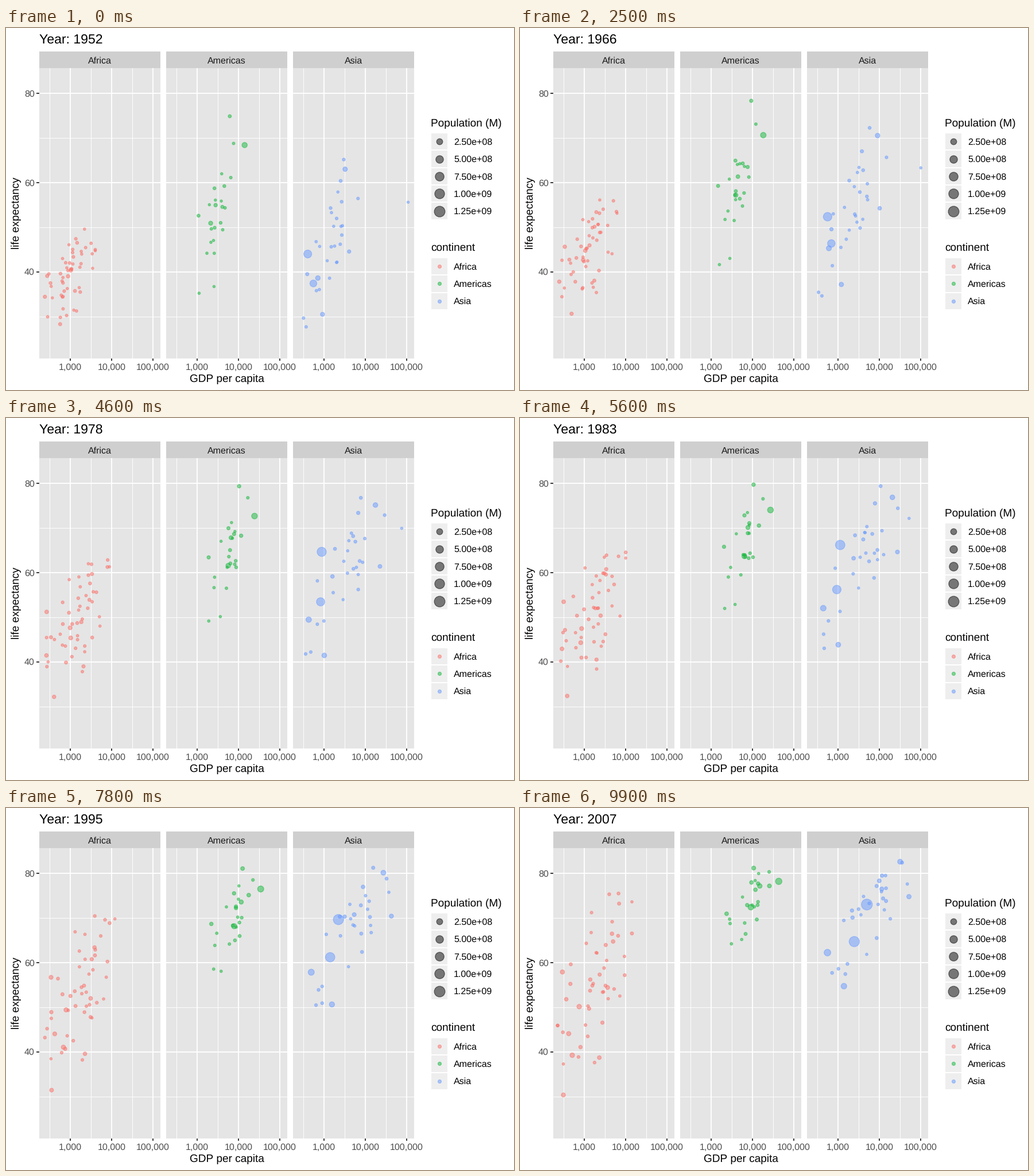
Recreate the animation shown at these times as a matplotlib script. Size 885 by 632 pixels, loop 10000 ms.

```python
import matplotlib.pyplot as plt
import numpy as np
from matplotlib.animation import FuncAnimation
from matplotlib.patches import Rectangle

W, H, DPI = 885, 632, 100
FRAMES, STEP = 100, 9                  # frames between two survey years
YEARS = np.arange(1952, 2008, 5)
AGE = (YEARS - YEARS[0]) / 55          # 0 to 1 over the whole period
GROWTH = 3.4                           # population factor over the period
MIN_POP, MAX_POP = 0.06, 1319          # millions
PX_PER_PT = 1.764                      # print points to stage pixels

plt.rcParams["font.family"] = "Liberation Sans"
plt.rcParams["text.hinting"] = "no_hinting"
plt.rcParams["text.hinting_factor"] = 1


def px_x(log_gdp):
    return 112.3 + 71.9 * (log_gdp - 3)


def px_y(life):
    return 114 + (80 - life) * 7.793


def dot_size(pop):
    share = (pop - MIN_POP) / (MAX_POP - MIN_POP)
    return 1 + 4 * np.sqrt(np.clip(share, 0, 1))


def dot_area(size):
    """Marker area in square points, outline included in the diameter."""
    px = (size * 2.845 + 0.945) * 0.75 * PX_PER_PT - 1
    return (px * 72 / DPI) ** 2


def trend(values):
    """A row per survey year, through values at the start, 1980 and the end."""
    return np.interp(YEARS, [1952, 1980, 2007], values)[:, None]


def wander(rng, n):
    """Normal scores that turn slowly, with a small hop at each survey."""
    a, b = rng.standard_normal((2, n))
    a, b = [(v - v.mean()) / v.std() for v in (a, b)]
    turn = 0.8 * AGE[:, None]
    hop = 0.12 * rng.standard_normal((len(YEARS), n))
    return np.clip(a * np.cos(turn) + b * np.sin(turn) + hop, -2, 2)


def cloud(seed, n, gdp, gdp_sd, life, life_sd, link, pop, pop_sd):
    """Small countries: health follows wealth with correlation `link`."""
    rng = np.random.default_rng(seed)
    wealth, other = wander(rng, n), wander(rng, n)
    health = link * wealth + np.sqrt(1 - link ** 2) * other
    people = pop * np.exp(pop_sd * np.clip(rng.standard_normal(n), -2, 2))
    return np.stack([px_x(trend(gdp) + trend(gdp_sd) * wealth),
                     px_y(trend(life) + trend(life_sd) * health),
                     dot_size(people * GROWTH ** AGE[:, None])], axis=1)


def path(gdp, life, pop):
    """One prominent country, through a few key years."""
    keys = [1952, 1962, 1972, 1990, 2007]
    people = pop[0] * (pop[1] / pop[0]) ** AGE
    return np.stack([px_x(np.interp(YEARS, keys, np.log10(gdp))),
                     px_y(np.interp(YEARS, keys, life)),
                     dot_size(people)], axis=1)[:, :, None]


africa = [cloud(4, 52, gdp=[2.98, 3.20, 3.25], gdp_sd=[0.31, 0.39, 0.45],
                life=[39.1, 50.5, 54.8], life_sd=[5.1, 7.2, 9.6],
                link=0.45, pop=2.5, pop_sd=1.2)]
americas = [
    path([13990, 16173, 21806, 31000, 42952], [68.4, 70.2, 71.3, 75.7, 78.2], [158, 301]),
    path([2109, 3337, 4986, 7300, 9066], [50.9, 55.7, 59.5, 66.2, 72.4], [57, 190]),
    cloud(11, 23, gdp=[3.47, 3.78, 3.93], gdp_sd=[0.22, 0.24, 0.28],
          life=[52.7, 65.3, 73.4], life_sd=[9, 6.5, 4.3],
          link=0.6, pop=3, pop_sd=1.1)]
asia = [
    path([400, 488, 677, 1530, 4959], [44, 45.5, 63.1, 68.1, 73], [556, 1319]),
    path([547, 658, 724, 1080, 2452], [37.4, 43.6, 50.7, 59.6, 64.7], [372, 1110]),
    path([3217, 6577, 14779, 25300, 31656], [63, 68.7, 73.4, 79, 82.6], [87, 127]),
    path([108382, 95458, 109348, 33000, 47307], [55.6, 60.5, 67.7, 74.9, 77.6], [0.2, 2.5]),
    cloud(7, 29, gdp=[3.16, 3.55, 3.74], gdp_sd=[0.33, 0.50, 0.50],
          life=[46.3, 61.3, 70.6], life_sd=[9, 8.5, 7.0],
          link=0.7, pop=6, pop_sd=1.4)]

PANELS = [("Africa", "#FB7069", africa),
          ("Americas", "#16B83D", americas),
          ("Asia", "#689AFF", asia)]
POSES = [np.concatenate(parts, axis=2) for _, _, parts in PANELS]

fig = plt.figure(figsize=(W / DPI, H / DPI), dpi=DPI, facecolor="white")
ax = fig.add_axes([0, 0, 1, 1])
ax.set(xlim=(0, W), ylim=(H, 0))
ax.axis("off")


def text(x, y, s, px, color="black", **kw):
    return ax.text(x, y, s, fontsize=px * 72 / DPI, color=color,
                   va="baseline", **kw)


def box(x, y, w, h, color):
    ax.add_patch(Rectangle((x, y), w, h, facecolor=color, lw=0, zorder=0))


def line(xs, ys, px, color="white"):
    ax.plot(xs, ys, color=color, lw=px * 72 / DPI,
            solid_capstyle="butt", zorder=1)


def dots(x, y, size, color):
    return ax.scatter(x, y, s=dot_area(size), c=color, alpha=0.5, zorder=3,
                      edgecolors=color, linewidths=1.25 * 72 / DPI)


LEFT, PANEL_W, PITCH, TOP, BOTTOM = 58, 211.4, 221, 70.3, 576.5
GREY, TICK = "#4D4D4D", "#333333"
MAJOR, MINOR = 1.88, 0.94

clouds = []
for i, (name, color, _) in enumerate(PANELS):
    dx = i * PITCH
    x0, x1 = LEFT + dx, LEFT + dx + PANEL_W
    box(x0, 41, PANEL_W, TOP - 41, "#CFCFCF")
    box(x0, TOP, PANEL_W, BOTTOM - TOP, "#E5E5E5")
    text((x0 + x1) / 2, 61.5, name, 15.5, "#1A1A1A", ha="center")
    for shift, width in ((0.5, MINOR), (0, MAJOR)):
        for k in range(3):
            y, x = px_y(80 - 20 * (k + shift)), px_x(3 + k - shift) + dx
            line([x0, x1], [y, y], width)
            line([x, x], [TOP, BOTTOM], width)
    for e in (3, 4, 5):
        x = px_x(e) + dx
        line([x, x], [BOTTOM, BOTTOM + 4.85], MAJOR, TICK)
        text(x, 597, f"{10 ** e:,}", 15.5, GREY, ha="center")
    x, y, size = POSES[i][0]
    clouds.append(dots(x + dx, y, size, color))

for life in (80, 60, 40):
    y = px_y(life)
    line([LEFT - 4.85, LEFT], [y, y], MAJOR, TICK)
    text(49.8, y + 5.6, str(life), 15.5, GREY, ha="right")

text(384.7, 618.5, "GDP per capita", 19.4, ha="center")
text(23, 323.5, "life expectancy", 19.4, ha="center",
     rotation=90, rotation_mode="anchor")
title = text(58, 26.3, "", 23.3)


def legend_key(y, label, color, size):
    box(741, y - 14.2, 28.4, 28.4, "#EEEEEE")
    dots([755.2], [y], size, color)
    text(780, y + 5.6, label, 15.5)


text(740.3, 172, "Population (M)", 19.4)
for i in range(5):
    pop = 250 * (i + 1)
    legend_key(198.2 + 30.35 * i, f"{pop * 1e6:.2e}", "black", dot_size(pop))
text(740.3, 389, "continent", 19.4)
for i, (name, color, _) in enumerate(PANELS):
    legend_key(416 + 30.35 * i, name, color, 1.5)


def draw(frame):
    title.set_text(f"Year: {1952 + 55 * frame / (FRAMES - 1):.0f}")
    k = min(frame // STEP, len(YEARS) - 2)
    f = frame / STEP - k
    for i, (dots_i, poses) in enumerate(zip(clouds, POSES)):
        x, y, size = poses[k] * (1 - f) + poses[k + 1] * f
        dots_i.set_offsets(np.column_stack([x + i * PITCH, y]))
        dots_i.set_sizes(dot_area(size))
    return [title, *clouds]


anim = FuncAnimation(fig, draw, frames=FRAMES, interval=100, repeat=True,
                     repeat_delay=0, init_func=lambda: draw(0), blit=False)
plt.show()
```
